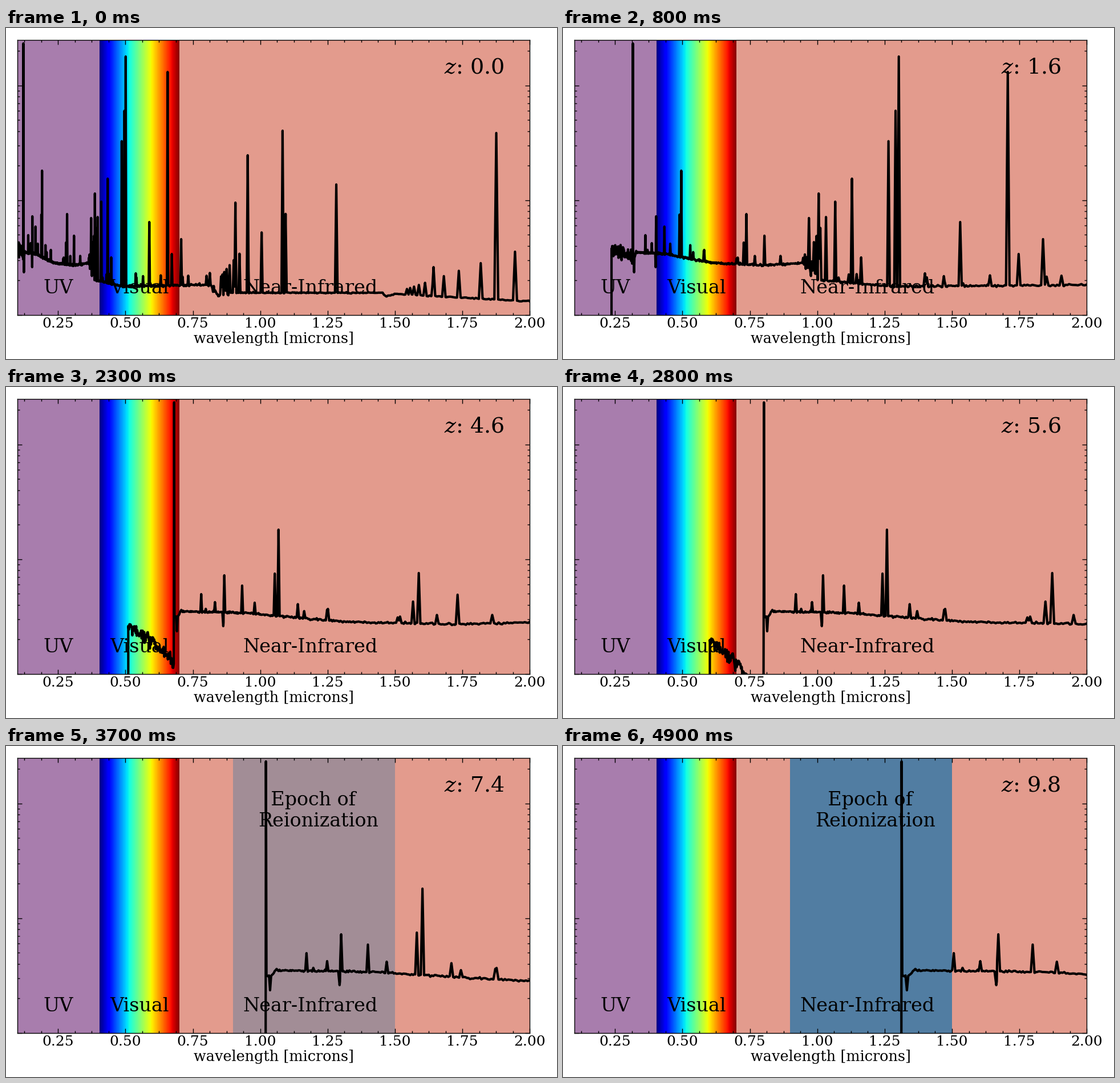
A matplotlib script for the animation above (5000 ms loop, 966 by 580 pixels).

```python
import numpy as np
import matplotlib.pyplot as plt
from matplotlib.animation import FuncAnimation
from matplotlib.ticker import MultipleLocator, NullFormatter

plt.rcParams.update({"font.family": "DejaVu Serif", "mathtext.fontset": "dejavuserif",
                     "axes.linewidth": 0.5})

W, H, DPI = 966, 580, 200
LEFT, RIGHT, TOP, BOTTOM = 20.3, 918.3, 20.8, 502.8
DECADE = 201                      # pixels per factor of ten in flux
FRAMES, Z_STEP = 50, 0.2
VISIBLE = 0.403, 0.701
LYMAN_LIMIT, LYMAN_ALPHA = 91.18, 121.57

# Continuum knots: wavelength in nm, height on the stage in pixels
CONTINUUM = [
    (80, 380), (121, 392), (122, 402), (124, 402), (126, 393), (170, 396),
    (232, 411), (300, 416), (376, 412), (384, 441), (490, 453), (818, 450),
    (826, 464), (1455, 464), (1465, 471), (1500, 466), (2000, 479), (2200, 481)]

# Strong metal and helium lines: wavelength in nm, height of the tip
METALS = [
    (123.4, 428), (139.5, 363), (148.6, 377), (154.1, 419), (154.8, 330), (166.6, 348),
    (174.9, 378), (188.2, 327), (190.7, 250), (279.8, 376), (283.6, 326), (309.3, 364),
    (372.8, 333), (386.7, 290), (447.3, 402), (496.4, 145), (501, 50), (588.6, 340),
    (672, 396), (706.8, 370), (908, 306), (953.6, 223), (1083, 180), (1643, 419)]


def hydrogen(lower, first, last, base, height, power):
    """Recombination lines crowding toward the series limit and growing weaker."""
    return [(LYMAN_LIMIT / (lower ** -2 - n ** -2), base - height * (first / n) ** power)
            for n in range(first, last)]


def rest_spectrum():
    rng = np.random.default_rng(4)
    grid = np.exp(np.arange(np.log(80), np.log(2200), 1 / 300))
    sigma = np.select([grid < LYMAN_ALPHA, (grid > 364) & (grid < 384),
                       (grid > 820) & (grid < 890), grid < 830], [6, 11, 4, 0.9], 0.5)
    level = np.interp(grid, *zip(*CONTINUUM)) + rng.normal(0, 1, grid.size) * sigma

    weak = rng.uniform(140, 820, 26)
    lines = METALS + [(nm, np.interp(nm, grid, level) - rng.uniform(4, 24)) for nm in weak]
    lines += [(LYMAN_ALPHA, 27)]
    lines += hydrogen(2, 3, 11, 443, 366, 1.4)
    lines += hydrogen(3, 4, 16, 463, 279, 1.75)
    lines += hydrogen(4, 8, 18, 468, 76, 2.6)

    def width(nm):
        return 0.002 if nm == LYMAN_ALPHA else 0.0038

    extra = [nm * (1 + k * width(nm)) for nm, _ in lines for k in (-1, -0.5, 0, 0.5, 1)]
    nm = np.unique(np.concatenate([grid, extra, [LYMAN_LIMIT - 0.05, LYMAN_LIMIT]]))
    base = np.interp(nm, grid, level)
    y = base.copy()
    for center, tip in lines:
        shape = np.clip(1 - np.abs(nm / center - 1) / width(center), 0, None)
        bump = (tip - base) * shape
        y = np.where(np.abs(bump) > np.abs(y - base), base + bump, y)
    return nm, y


REST, HEIGHT = rest_spectrum()


def observed(z):
    """Redshifted spectrum, dimmed by intergalactic hydrogen below Lyman alpha."""
    wave = REST * (1 + z)
    depth = 0.0041 * (wave / LYMAN_ALPHA) ** 3.2 * (z > 0)
    y = HEIGHT + np.where(REST < LYMAN_ALPHA - 0.05, DECADE * np.log10(np.e) * depth, 0)
    y = np.where(REST < LYMAN_LIMIT, 2000, np.minimum(y, 2000))
    return wave / 1000, 10 ** ((BOTTOM - y) / DECADE)


fig = plt.figure(figsize=(W / DPI, H / DPI), dpi=DPI, facecolor="white")
ax = fig.add_axes([LEFT / W, 1 - BOTTOM / H, (RIGHT - LEFT) / W, (BOTTOM - TOP) / H])
y_max = 10 ** ((BOTTOM - TOP) / DECADE)
ax.set_yscale("log")

ax.axvspan(0.1, VISIBLE[0], color="#a87dad", lw=0)
ax.axvspan(VISIBLE[1], 2.0, color="#e39b8d", lw=0)
ax.pcolormesh(np.linspace(*VISIBLE, 257), [0.5, 2 * y_max], np.arange(256)[None],
              cmap="jet")
epoch = ax.axvspan(0.9, 1.5, color="#517da2", lw=0)

ax.set_xlim(0.1, 2.0)
ax.set_ylim(1, y_max)
ax.xaxis.set_major_locator(MultipleLocator(0.25))
ax.xaxis.set_minor_locator(MultipleLocator(0.0625))
for axis in (ax.xaxis, ax.yaxis):
    axis.set_major_formatter(NullFormatter())
    axis.set_minor_formatter(NullFormatter())
ax.tick_params(which="both", direction="in", top=True, right=True, width=0.5)
ax.tick_params(which="major", length=3)
ax.tick_params(which="minor", length=1.5)


def label(x, y, text, size=12, **kw):
    """Text with its baseline at a stage position in pixels."""
    return fig.text(x / W, 1 - y / H, text, fontsize=size, color="black", **kw)


for value in np.arange(0.25, 2.01, 0.25):
    x = LEFT + (value - 0.1) / 1.9 * (RIGHT - LEFT)
    label(x, 525, f"{value:.2f}", 9, ha="center")
label((LEFT + RIGHT) / 2, 552, "wavelength [microns]", 9.2, ha="center")

label(65.5, 465, "UV")
label(182.3, 465, "Visual")
label(415.8, 465, "Near-Infrared")
epoch_label = label(442.6, 141, "  Epoch of\nReionization")
z_label = label(768.5, 79, "", 13.7)
line, = ax.plot([], [], color="black", lw=1.5)


def update(frame):
    z = frame * Z_STEP
    line.set_data(*observed(z))
    z_label.set_text(f"$z$: {z:.1f}")
    # The band builds up once Lyman alpha reaches its left edge at z = 6.4
    layers = max(0, frame - 31)
    epoch.set_alpha(min(1, (1 - 0.95 ** layers) / (1 - 0.95 ** 18)))
    epoch_label.set_visible(layers > 0)
    return line, z_label, epoch, epoch_label


anim = FuncAnimation(fig, update, frames=FRAMES, interval=100, repeat=True,
                     repeat_delay=0, blit=False)
plt.show()
```
